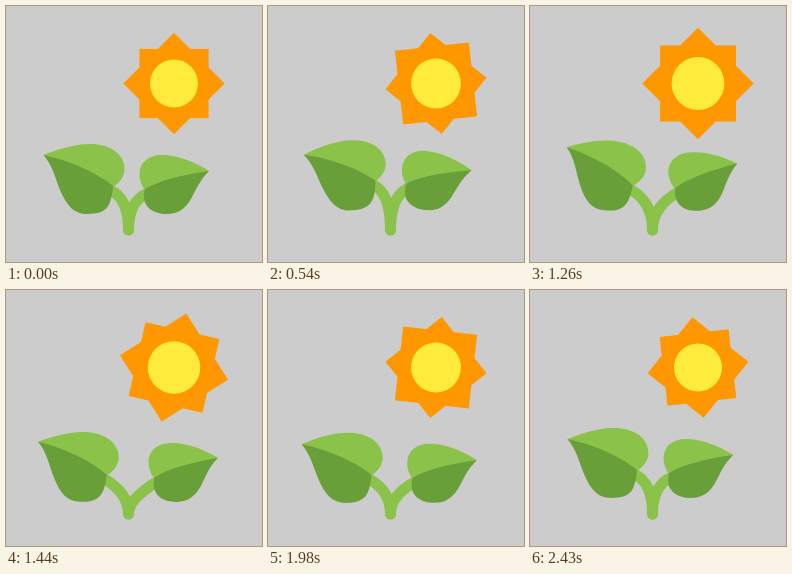
An HTML page for the animation above (2.52 s loop, 256x256 px).

```html
<!DOCTYPE html>
<html lang="en">
<head>
<meta charset="utf-8">
<title>Sprout in the sun</title>
<style>
html, body { margin: 0; width: 100%; height: 100%; overflow: hidden; background: #ccc; }
svg { display: block; width: 100vw; height: 100vh; }
</style>
</head>
<body>
<svg viewBox="0 0 256 256">
  <g id="sun">
    <g id="rays" fill="#ff9800">
      <rect x="-34.6" y="-34.6" width="69.2" height="69.2"/>
      <rect x="-35.8" y="-35.8" width="71.6" height="71.6" transform="rotate(45)"/>
    </g>
    <circle r="24" fill="#ffeb3b"/>
  </g>
  <g fill="none" stroke="#8bc34a" stroke-width="11" stroke-linecap="round">
    <path id="stemL"/>
    <path id="stemR"/>
  </g>
  <!-- each leaf is drawn around the point where it joins its stem -->
  <g id="leafL">
    <path fill="#8bc34a" d="M-69.5-31C-57-36-40-42-23-42C-3-42 11.5-32 11.5-17C11.5-9 6-3 0 1L-30 4Z"/>
    <path fill="#689f38" d="M-69.5-31C-60-20-58-8-52.5 5C-46 20-39 28-26 28C-13 28-5 25-2 13C-.8 8 0 4 0 0C-12-10-37-24-69.5-31Z"/>
  </g>
  <g id="leafR">
    <path fill="#8bc34a" d="M64-18C50-27 33-34 17-34C3-34-5.5-26-5.5-15C-5.5-8-3-3 0 1L30 4Z"/>
    <path fill="#689f38" d="M64-18C54-8 51 1 46 10C40 20 33 25 22 25C8 25-1 18-1 7C-1 4-.5 2 0 0C13-8 36-14 64-18Z"/>
  </g>
</svg>
<script>
const LOOP = 2520, STEP = 90;
const el = id => document.getElementById(id);

// dir: -1 left, 1 right; reach: how far the joint swings sideways
const leaves = [
  { side: 'L', dir: -1, x: 107, y: 180, reach: 1 },
  { side: 'R', dir: 1, x: 139, y: 183, reach: 1.5 }
];

function drawLeaf(leaf, swell, sway) {
  const { side, dir, reach } = leaf;
  const spread = reach * (4.3 * swell - 2.7 * sway);
  const x = leaf.x + dir * spread;
  const y = leaf.y - 6.7 * sway - swell;
  // the tip lags behind, then flicks up as the leaf falls
  const tilt = dir * (6 * swell + 2.5 * sway - 11.8 * swell ** 16);
  el('leaf' + side).setAttribute('transform', `translate(${x} ${y}) rotate(${tilt})`);
  el('stem' + side).setAttribute('d',
    `M122.5 224Q122.5 ${y + 12 + spread} ${x + dir * 3} ${y + 4}`);
}

function draw(t) {
  const w = 2 * Math.PI * t / LOOP;
  const swell = (1 - Math.cos(w)) / 2;      // 0 to 1 and back
  const sway = 2 * swell * Math.sin(w);     // up, then down
  el('sun').setAttribute('transform', `translate(168 77.5) scale(${1 + 0.1 * swell})`);
  el('rays').setAttribute('transform', `rotate(${180 * t / LOOP})`);
  leaves.forEach(leaf => drawLeaf(leaf, swell, sway));
}

const start = performance.now();
function tick() {
  const step = Math.floor((performance.now() - start + 2) / STEP);
  draw(step * STEP % LOOP);
  requestAnimationFrame(tick);
}
tick();
</script>
</body>
</html>
```
